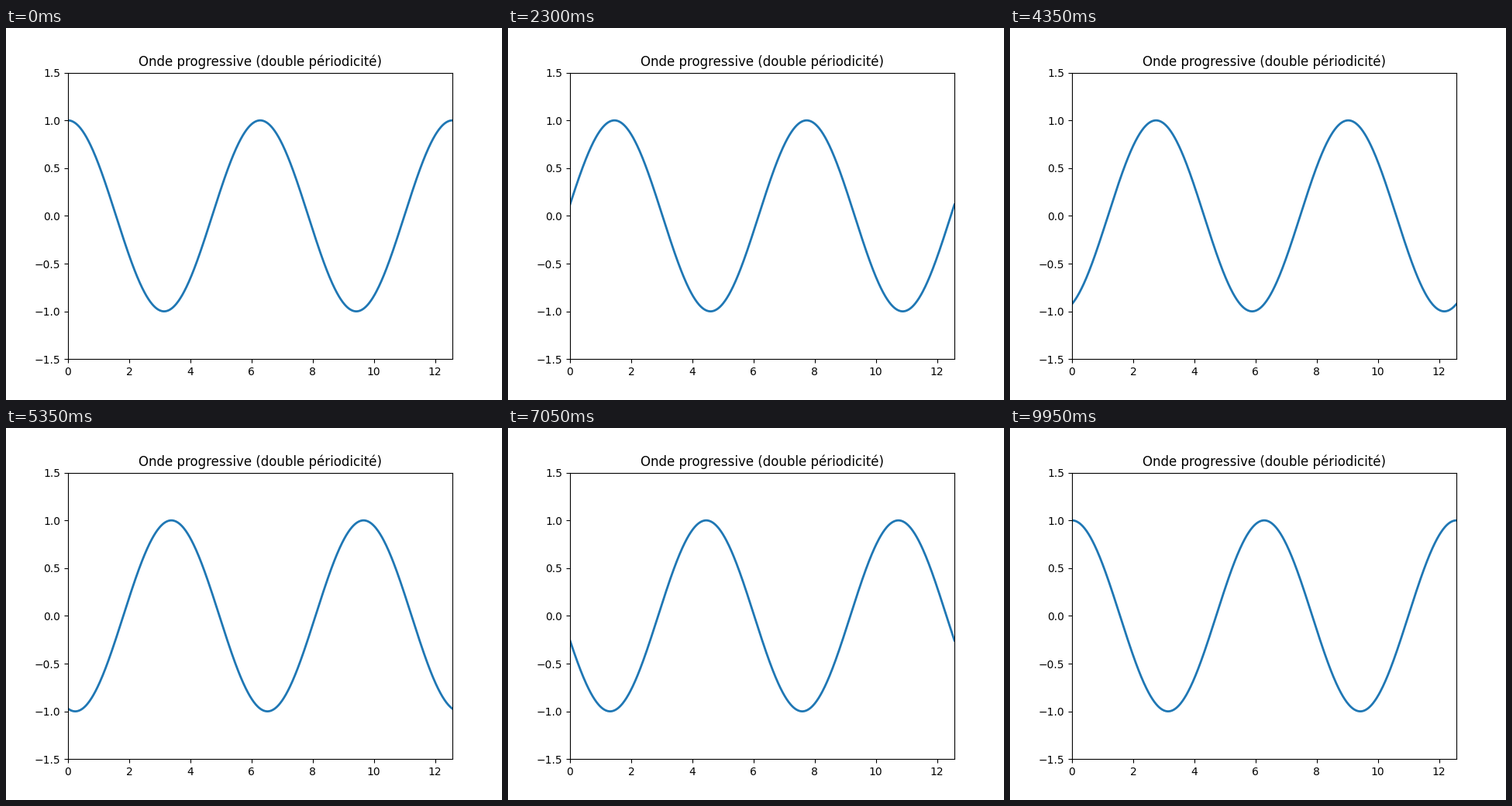
These frames come from a looping animation (640x480 px, 10 s). A matplotlib script:

```python
import numpy as np
import matplotlib.pyplot as plt
from matplotlib.animation import FuncAnimation

FRAMES = 200
INTERVAL = 50  # ms

x = np.linspace(0, 4 * np.pi, 1000)
# The last phase equals the first one, a full period later.
phases = np.linspace(0, 2 * np.pi, FRAMES)

fig, ax = plt.subplots(figsize=(6.4, 4.8), dpi=100)
ax.set_xlim(0, 4 * np.pi)
ax.set_ylim(-1.5, 1.5)
ax.set_title("Onde progressive (double périodicité)")
line, = ax.plot(x, np.cos(x), lw=2)


def update(frame):
    line.set_ydata(np.cos(x - phases[frame]))
    return line,


anim = FuncAnimation(fig, update, frames=FRAMES, interval=INTERVAL,
                     repeat=True, repeat_delay=0)
plt.show()
```
